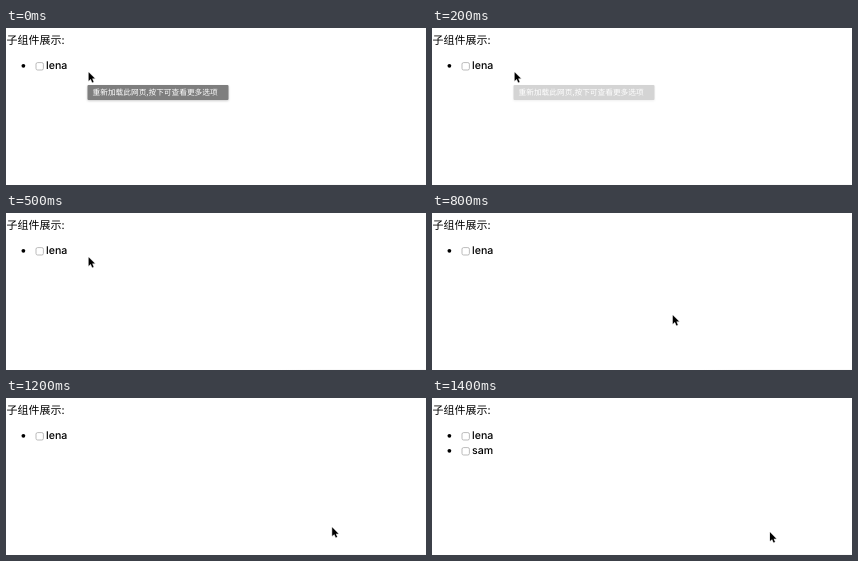
Animation of 420x157 px, one loop 1.5 s. Source, as an HTML page:

```html
<!DOCTYPE html>
<html lang="zh-CN">
<head>
<meta charset="utf-8">
<style>
html, body { margin: 0; width: 100%; height: 100%; overflow: hidden; background: #fff; }
svg { display: block; width: 420px; height: 157px; }
text { font: 11px "Noto Sans CJK SC", "Noto Sans CJK", sans-serif; text-rendering: geometricPrecision; }
.name { font: 500 10.6px Inter, sans-serif; }
#tip { filter: drop-shadow(0 1px 1px #0003); }
#tip text { font-size: 7.7px; font-weight: 500; fill: #fff; }
#cursor { filter: drop-shadow(0 .7px .6px #0006); }
</style>
</head>
<body>
<svg viewBox="0 0 420 157">
  <defs>
    <linearGradient id="fade">
      <stop offset="0" stop-color="#fff"/>
      <stop offset=".3" stop-color="#f8f8f8"/>
    </linearGradient>
    <g id="item">
      <circle cx="17.4" cy="37.8" r="1.9"/>
      <rect x="30" y="34.6" width="7.4" height="7.4" rx="1.6" fill="#fff" stroke="#aaa" stroke-width=".8"/>
    </g>
  </defs>
  <rect x="272" y="156" width="148" height="1" fill="url(#fade)"/>
  <text x=".4" y="15.6">子组件展示:</text>
  <use href="#item"/>
  <text class="name" x="40" y="41">lena</text>
  <g id="second">
    <use href="#item" y="15"/>
    <text class="name" x="40" y="56">sam</text>
  </g>
  <g id="tip">
    <rect x="81.5" y="57" width="141" height="15" rx="1" fill="#7e7e7e"/>
    <text x="86.5" y="67.4">重新加载此网页,按下可查看更多选项</text>
  </g>
  <path id="cursor" d="M0 0V8.8L2.1 6.9L3.6 10.3L5 9.7L3.6 6.4H6.3Z" stroke="#fff" stroke-width="1" paint-order="stroke"/>
</svg>
<script>
const LOOP = 1500, STEP = 100;
const $ = id => document.getElementById(id);
const tipAlpha = [1, .8, .33];
// [start time, x, y] of the pointer tip
const moves = [
  [0, 82.6, 44.2], [800, 240.8, 102.2], [900, 291, 120], [1000, 315, 127],
  [1200, 326.2, 129.3], [1300, 334, 133], [1400, 338, 134.3]
];

function draw(now) {
  const t = now % LOOP;
  const [, x, y] = moves.findLast(m => m[0] <= t);
  $("cursor").setAttribute("transform", `translate(${x} ${y})`);
  $("tip").style.opacity = tipAlpha[Math.floor(t / STEP)] ?? 0;
  $("second").style.display = t < 1400 ? "none" : "";
}

const start = performance.now();
function tick() {
  draw(performance.now() - start);
  requestAnimationFrame(tick);
}
tick();
</script>
</body>
</html>
```
